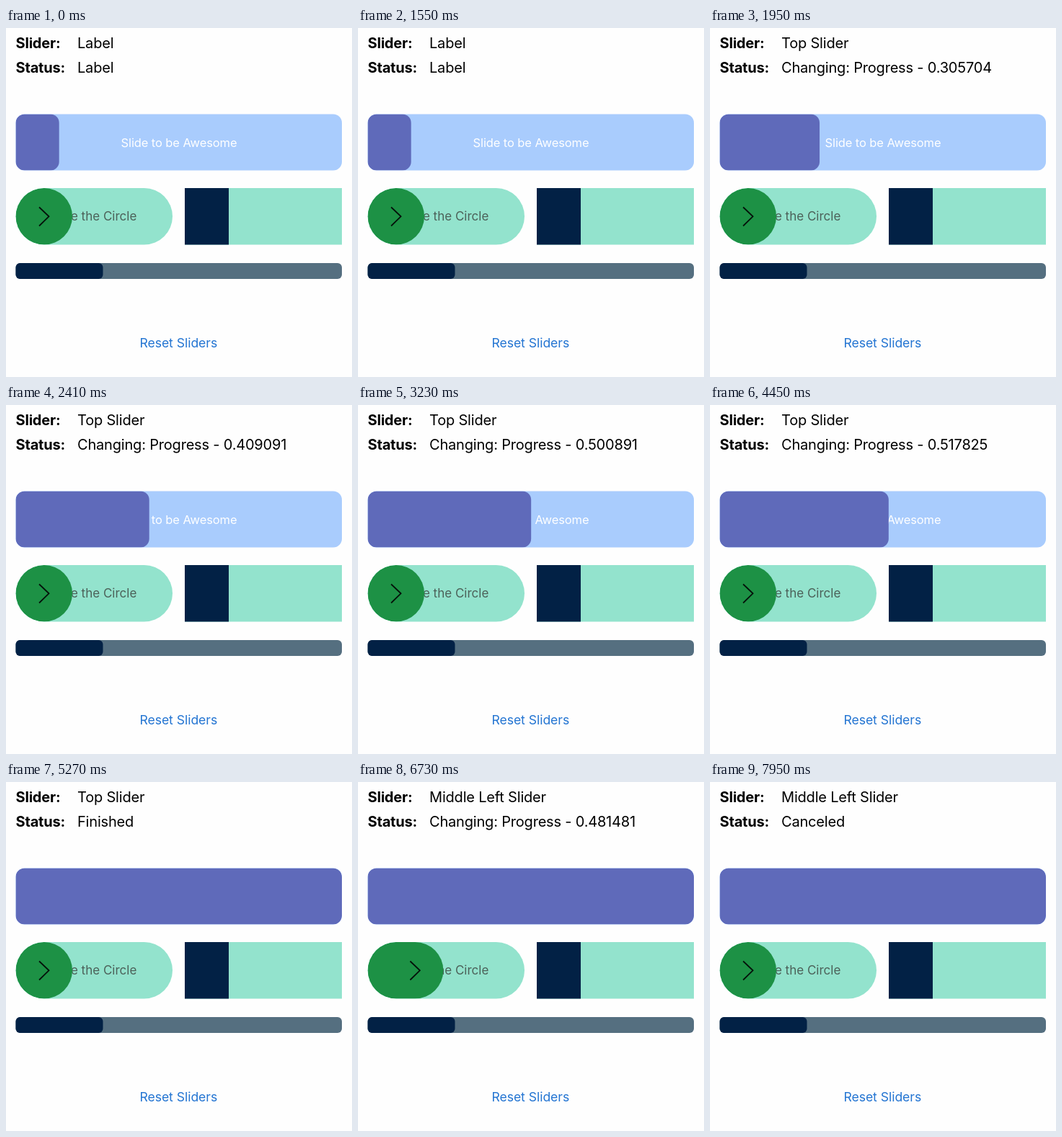
Write an HTML page that moves like this. It is 480 px wide and 484 px high and loops after 8000 ms.

```html
<!DOCTYPE html>
<html lang="en">
<head>
<meta charset="utf-8">
<title>Sliders</title>
<style>
  html, body { margin: 0; width: 100%; height: 100%; overflow: hidden; background: #fefefe; }
  svg { display: block; width: 480px; height: 484px; }
  text { font-family: Inter, "Open Sans", sans-serif; white-space: pre; }
  .info { font-size: 20px; letter-spacing: -.19px; }
  .bold { font-weight: 700; }
  .hint { font-size: 16.5px; letter-spacing: -.1px; }
</style>
</head>
<body>
<svg viewBox="0 0 480 484">
  <defs>
    <clipPath id="topTrack"><rect x="13.5" y="119.5" width="452.5" height="78" rx="12"/></clipPath>
    <clipPath id="pillTrack"><rect x="13.5" y="222" width="217.5" height="78.5" rx="39.2"/></clipPath>
  </defs>

  <text class="info bold" x="13.5" y="28">Slider:</text>
  <text class="info bold" x="13.5" y="62">Status:</text>
  <text class="info" id="name" x="99" y="28">Label</text>
  <text class="info" id="status" x="99" y="62">Label</text>

  <g clip-path="url(#topTrack)">
    <rect x="13" y="119" width="454" height="79" fill="#a9ccfd"/>
    <text class="hint" x="240" y="164.5" text-anchor="middle" fill="#fff">Slide to be Awesome</text>
    <rect id="topFill" x="13.5" y="119.5" height="78" rx="12" fill="#5f6aba"/>
  </g>

  <g clip-path="url(#pillTrack)">
    <rect x="13" y="222" width="219" height="79" fill="#93e3cd"/>
    <text x="181.3" y="267" text-anchor="end" font-size="17" fill="#4c6159">Slide the Circle</text>
    <rect id="pillFill" x="13.5" y="222" height="78.5" rx="39.2" fill="#1d9145"/>
    <path id="arrow" d="M46 248.5L59.5 261.3L46 274.5" fill="none" stroke="#04120a" stroke-width="1.8"/>
  </g>

  <rect x="248" y="222" width="218" height="78.5" fill="#93e3cd"/>
  <rect x="248" y="222" width="61" height="78.5" fill="#022145"/>

  <rect x="13.5" y="326" width="452.5" height="22" rx="6" fill="#556f80"/>
  <rect x="13.5" y="326" width="121" height="22" rx="6" fill="#022145"/>

  <text x="239.3" y="442.5" text-anchor="middle" font-size="17.6" letter-spacing="-.05" fill="#2475d2">Reset Sliders</text>
</svg>
<script>
  const LOOP = 8000;
  const TOP_START = 1590, TOP_RELEASE = 4760;
  const PILL_START = 6050, PILL_RELEASE = 6980;
  const TOP_WIDTH = 452.5, PILL_WIDTH = 217.5, PILL_REST = 78.5 / PILL_WIDTH;

  // [time, progress] pairs
  const topKeys = [
    [TOP_START, .133], [2410, .409091], [3230, .500891], [4300, .517825],
    [TOP_RELEASE, .517825], [5060, 1]
  ];
  const pillKeys = [
    [PILL_START, PILL_REST], [6550, .47], [PILL_RELEASE, .49], [7250, PILL_REST]
  ];

  const byId = id => document.getElementById(id);
  const [nameText, statusText, topFill, pillFill, arrow] =
    ["name", "status", "topFill", "pillFill", "arrow"].map(byId);

  function valueAt(keys, t) {
    if (t <= keys[0][0]) return keys[0][1];
    const next = keys.findIndex(key => t < key[0]);
    if (next < 0) return keys[keys.length - 1][1];
    const [t0, v0] = keys[next - 1], [t1, v1] = keys[next];
    const u = (t - t0) / (t1 - t0);
    return v0 + (v1 - v0) * (1 - (1 - u) ** 1.7);
  }

  // Drags move in whole device pixels, which the readout reflects.
  const changing = (progress, pixels) =>
    "Changing: Progress - " + (Math.round(progress * pixels) / pixels).toFixed(6);

  function labelsAt(t, top, pill) {
    if (t < TOP_START) return ["Label", "Label"];
    if (t < TOP_RELEASE) return ["Top Slider", changing(top, 1122)];
    if (t < PILL_START) return ["Top Slider", "Finished"];
    if (t < PILL_RELEASE) return ["Middle Left Slider", changing(pill, 540)];
    return ["Middle Left Slider", "Canceled"];
  }

  function render(t) {
    const top = valueAt(topKeys, t), pill = valueAt(pillKeys, t);
    [nameText.textContent, statusText.textContent] = labelsAt(t, top, pill);
    topFill.setAttribute("width", top * TOP_WIDTH);
    pillFill.setAttribute("width", pill * PILL_WIDTH);
    arrow.setAttribute("transform", `translate(${(pill - PILL_REST) * PILL_WIDTH} 0)`);
  }

  const start = performance.now();
  function tick() {
    render((performance.now() - start) % LOOP);
    requestAnimationFrame(tick);
  }
  tick();
</script>
</body>
</html>
```
